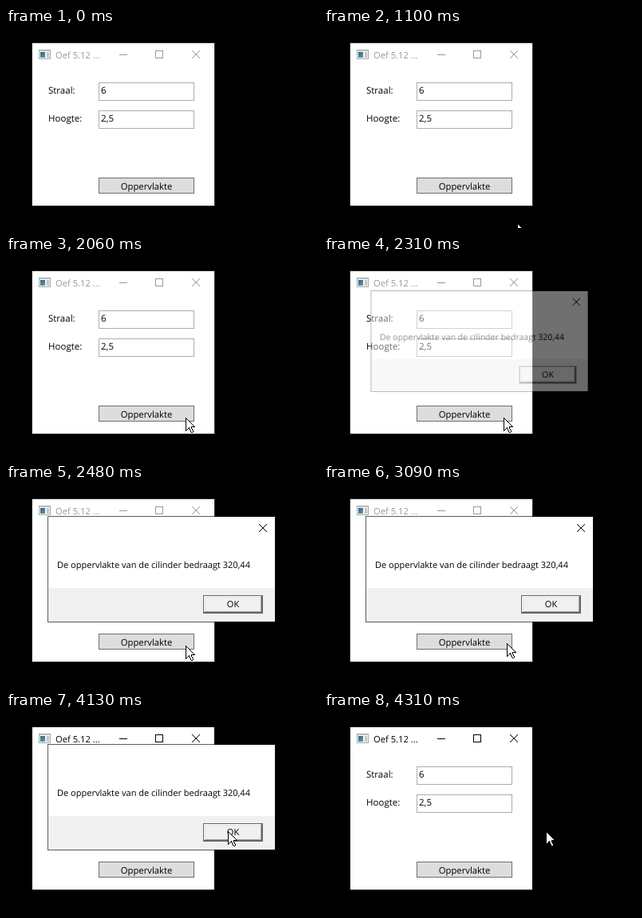
Write an HTML page with a canvas that moves like this. It is 391x250 px and loops after 5.32 s.

```html
<!DOCTYPE html>
<html lang="nl">
<head>
<meta charset="utf-8">
<title>Oppervlakte</title>
<style>
html, body { margin: 0; width: 100%; height: 100%; overflow: hidden; background: #000; }
canvas { display: block; width: 100vw; height: 100vh; }
</style>
</head>
<body>
<canvas id="stage" width="391" height="250"></canvas>
<script>
const LOOP = 5320;
const STEP = 80; // the screen refreshes moving parts at this interval
const FONT = '"Open Sans", "Noto Sans", sans-serif';
const EDGE = 'rgba(0, 0, 0, 0.64)';

const stage = document.getElementById('stage').getContext('2d', { alpha: false });
const layer = document.createElement('canvas');
layer.width = 391;
layer.height = 250;
const dialogCtx = layer.getContext('2d');

const APPEAR = 1100, HOVER = 1420, PRESS = 2000, RELEASE = 2060;
const OPEN = 2160, CLOSE = 4130, GONE = 4310;

const ENTRY = { x: 242, y: 244 };
const MOVES = [
  { start: APPEAR, end: 1500, x: 225, y: 204 },
  { start: 1590, end: 1750, x: 225, y: 202 },
  { start: 3010, end: 3480, x: 273, y: 160 },
  { start: 3480, end: 3670, x: 277, y: 151 },
  { start: 3760, end: 3840, x: 278, y: 149 }
];

const within = (t, from, to) => t >= from && t < to;
const mix = (a, b, u) => a + (b - a) * u;
const smooth = u => u * u * (3 - 2 * u);
const easeOut = u => 1 - (1 - u) ** 2;

// Progress from 0 to 1 that advances only once per STEP.
function progress(t, start, end) {
  if (t >= end) return 1;
  const elapsed = Math.floor((t - start) / STEP) * STEP;
  return Math.max(0, elapsed / (end - start));
}

function rect(c, x, y, w, h, fill) {
  c.fillStyle = fill;
  c.fillRect(x, y, w, h);
}

function box(c, x, y, w, h, fill, border) {
  rect(c, x + 1, y + 1, w - 2, h - 2, fill);
  c.strokeStyle = border;
  c.lineWidth = 1;
  c.strokeRect(x + 0.5, y + 0.5, w - 1, h - 1);
}

function text(c, str, x, y, size, color = '#000', align = 'left') {
  c.font = `${size}px ${FONT}`;
  c.textRendering = 'geometricPrecision';
  c.textAlign = align;
  c.fillStyle = color;
  c.fillText(str, x, y);
}

function cross(c, x, y, color) {
  c.strokeStyle = color;
  c.lineWidth = 1;
  c.beginPath();
  c.moveTo(x, y);
  c.lineTo(x + 10, y + 10);
  c.moveTo(x + 10, y);
  c.lineTo(x, y + 10);
  c.stroke();
}

function appIcon(c) {
  box(c, 41, 27, 15, 12, '#f2f4f5', '#a4a9ad');
  rect(c, 42, 28, 13, 1, '#c9cdd0');
  const panel = c.createLinearGradient(43, 30, 48, 37);
  panel.addColorStop(0, '#35618f');
  panel.addColorStop(1, '#5c9a9c');
  rect(c, 43, 30, 6, 7, panel);
  rect(c, 51, 30, 3, 7, '#c3c8cc');
}

function buttonColors(t) {
  if (within(t, PRESS, RELEASE)) return ['#c4e5f6', '#2c628b'];
  if (within(t, HOVER, PRESS)) return ['#bee6fd', '#3c7fb1'];
  return ['#dddddd', '#707070'];
}

function mainWindow(c, t) {
  const active = within(t, PRESS, RELEASE) || t >= CLOSE;
  const ink = active ? '#000' : '#999';
  box(c, 32, 18, 230, 205, '#fff', active ? EDGE : '#2a2a2a');
  appIcon(c);
  text(c, 'Oef 5.12 ...', 62, 38, 11.2, ink);
  rect(c, 142, 33, 10, 1, ink);
  box(c, 187, 28, 10, 10, '#fff', ink);
  cross(c, 233, 28, ink);

  [['Straal:', '6', 68], ['Hoogte:', '2,5', 103]].forEach(([label, value, y]) => {
    text(c, label, 53, y + 14, 11.5);
    box(c, 116, y, 120, 23, '#fff', '#abadb3');
    text(c, value, 119, y + 14, 11.5);
  });

  box(c, 116, 187, 120, 20, ...buttonColors(t));
  text(c, 'Oppervlakte', 176, 202, 11.3, '#000', 'center');
}

function okButton(c, pressed) {
  const x = 247, y = 139, w = 75, h = 23;
  const bevel = (inset, light, shade) => {
    const bw = w - 2 * inset, bh = h - 2 * inset;
    rect(c, x + inset, y + inset, bw, bh, shade);
    rect(c, x + inset, y + inset, bw - 1, bh - 1, light);
  };
  bevel(0, '#646464', '#646464');
  if (pressed) {
    box(c, x + 1, y + 1, w - 2, h - 2, '#f0f0f0', '#a0a0a0');
  } else {
    bevel(1, '#fff', '#696969');
    bevel(2, '#e3e3e3', '#a0a0a0');
    rect(c, x + 3, y + 3, w - 6, h - 6, '#f0f0f0');
  }
  const shift = pressed ? 1 : 0;
  text(c, 'OK', 284.5 + shift, 154 + shift, 11, '#000', 'center');
}

function dialog(c, t) {
  if (!within(t, OPEN + STEP, GONE)) return;
  const shown = t < CLOSE
    ? easeOut(progress(t, OPEN, OPEN + 4 * STEP))
    : 1 - progress(t, CLOSE, GONE);
  const scale = mix(0.92, 1, shown);

  const d = dialogCtx;
  d.clearRect(0, 0, 391, 250);
  box(d, 52, 40, 286, 133, '#fff', EDGE);
  rect(d, 53, 130, 284, 42, '#f0f0f0');
  if (t < CLOSE) cross(d, 317, 50, '#000');
  text(d, 'De oppervlakte van de cilinder bedraagt 320,44', 64, 105, 11.03);
  okButton(d, within(t, 3910, 3970));

  c.save();
  c.globalAlpha = shown;
  c.translate(195, 106.5);
  c.scale(scale, scale);
  c.drawImage(layer, -195, -106.5);
  c.restore();
}

function pointerAt(t) {
  let { x, y } = ENTRY;
  for (const move of MOVES) {
    const u = smooth(progress(t, move.start, move.end));
    x = mix(x, move.x, u);
    y = mix(y, move.y, u);
  }
  return [Math.round(x), Math.round(y)];
}

// Arrow built row by row: a black span with a white span inside it.
function pointer(c, t) {
  if (t < APPEAR) return;
  const [px, py] = pointerAt(t);
  const row = (x, y, width, inner = width - 2) => {
    rect(c, px + x, py + y, width, 1, '#000');
    if (inner > 0) rect(c, px + x + 1, py + y, inner, 1, '#fff');
  };
  for (let y = 0; y < 11; y++) row(0, y, y + 1);
  row(0, 11, 12, 6);
  for (let y = 12; y < 17; y++) row(0, y, 17 - y);
  for (let y = 12; y < 18; y++) row(4 + ((y - 12) >> 1), y, 4);
  row(7, 18, 2);
}

function draw(now) {
  const t = now % LOOP;
  rect(stage, 0, 0, 391, 250, '#000');
  mainWindow(stage, t);
  dialog(stage, t);
  pointer(stage, t);
}

const start = performance.now();
function tick() {
  draw(performance.now() - start);
  requestAnimationFrame(tick);
}
tick();
</script>
</body>
</html>
```
